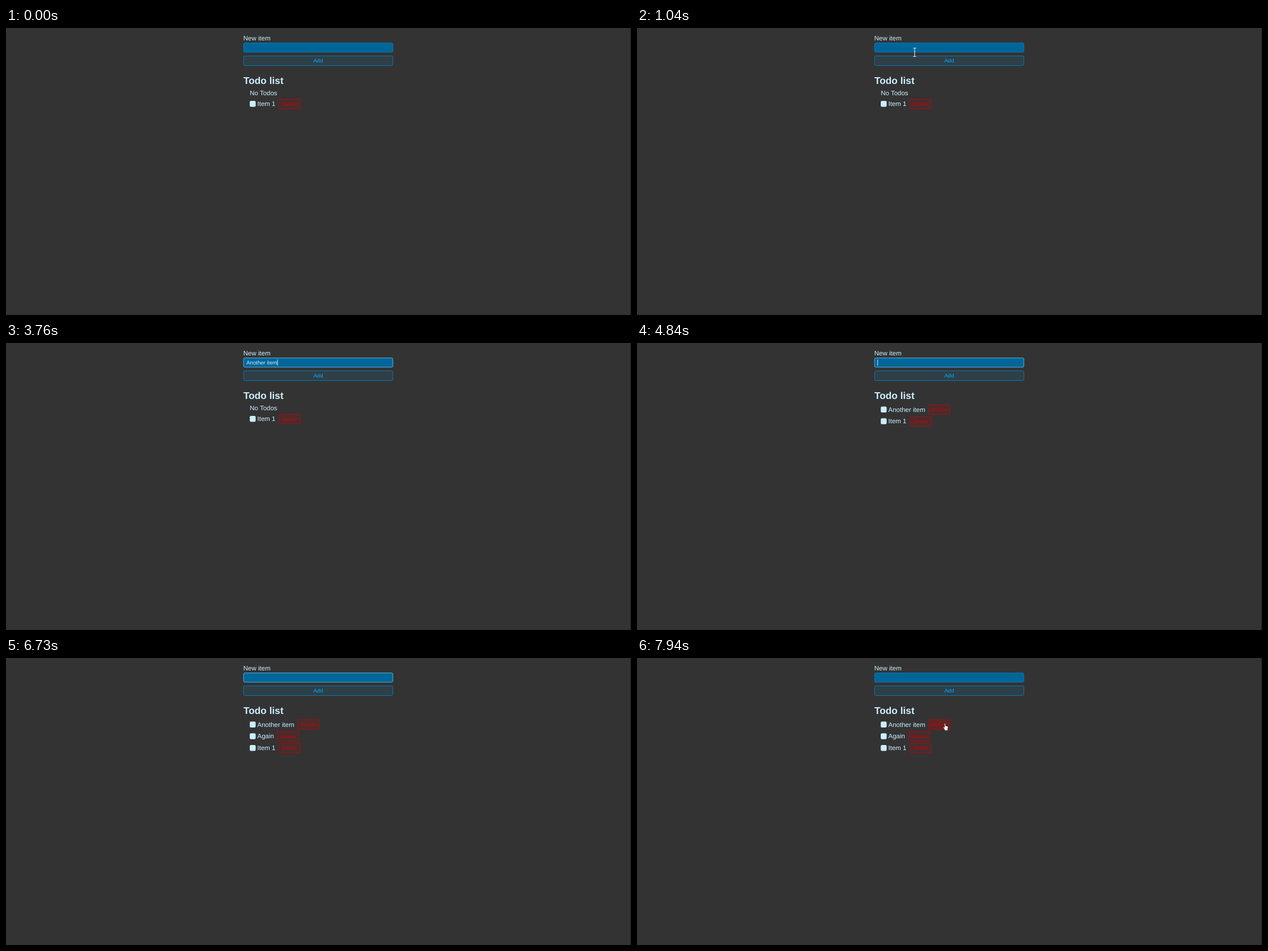
Animation, 1103 px wide and 508 px high, one loop 8000 ms. Source, as an HTML page:

```html
<!DOCTYPE html>
<html lang="en">
<head>
<meta charset="utf-8">
<title>Todo list</title>
<style>
  html, body { margin: 0; width: 100%; height: 100%; overflow: hidden; background: #333; }
  svg { display: block; width: 100vw; height: 100vh; }
  text {
    font: 11.52px "Liberation Sans", Arial, sans-serif;
    fill: hsl(200, 100%, 90%);
    text-rendering: geometricPrecision;
    white-space: pre;
  }
  .title { font-size: 17.28px; font-weight: bold; }
  .small { font-size: 9.6px; }
  .center { text-anchor: middle; }
  .field { fill: hsl(200, 100%, 30%); stroke: hsl(200, 100%, 40%); stroke-width: .8; }
  .field.focus { stroke: hsl(200, 100%, 70%); }
  .button rect { fill: hsla(200, 100%, 50%, .1); stroke: hsl(200, 100%, 40%); stroke-width: .8; }
  .button text { fill: hsl(200, 100%, 50%); }
  .button.hover rect { fill: hsla(200, 100%, 50%, .2); }
  .danger rect { fill: hsla(0, 100%, 40%, .1); stroke: hsl(0, 100%, 40%); }
  .danger text { fill: hsl(0, 100%, 40%); }
  .danger.hover rect { fill: hsla(0, 100%, 40%, .25); }
  .light { fill: hsl(200, 100%, 90%); }
  .cursor { fill: #fff; stroke: #111; stroke-width: .6; stroke-linejoin: round; }
  #beam { fill: none; stroke: #fff; stroke-width: 1; }
</style>
</head>
<body>
<svg viewBox="0 0 1103 508" preserveAspectRatio="none">
  <rect width="1103" height="508" fill="#333"/>
  <rect y="505" width="1103" height="3" fill="#382f32"/>
  <rect x="1102" width="1" height="508" fill="#1c1c1c"/>

  <text x="418.8" y="21.8">New item</text>
  <rect id="field" class="field" x="419.3" y="26.4" width="263.4" height="16.4" rx="2.3"/>
  <text id="value" class="small" x="424.2" y="37.7"></text>
  <rect id="caret" class="light" y="29.3" width="1" height="10.7"/>

  <g id="add" class="button">
    <rect x="419.3" y="49.4" width="263.4" height="17" rx="2.3"/>
    <text class="small center" x="551" y="60.6">Add</text>
  </g>

  <text class="title" x="419" y="99.3">Todo list</text>
  <text id="empty" x="430.2" y="119.4">No Todos</text>
  <g id="rows"></g>

  <path id="arrow" class="cursor" d="M0 0V10.2L2.3 8.1L3.8 11.6L5.4 10.9L3.9 7.5H7.2Z"/>
  <path id="hand" class="cursor" d="M-.8 .7Q0 -.6 .9 .7V4.6L4.2 5.2Q5.6 5.5 5.5 7L4.8 10.5V13H-.4V11.4L-3 7.8Q-3.4 6.4 -2.1 6.6L-.8 7.7Z"/>
  <path id="beam" d="M-2.5 -7.5H-.7L0 -7L.7 -7.5H2.5M0 -7V7M-2.5 7.5H-.7L0 7L.7 7.5H2.5"/>
</svg>

<script>
const LOOP = 8000;
const $ = id => document.getElementById(id);

const typing = [
  [0, ""], [2660, "A"], [2750, "An"], [2900, "Ano"], [2990, "Anot"],
  [3140, "Anoth"], [3220, "Anothe"], [3300, "Another "], [3450, "Another i"],
  [3540, "Another it"], [3690, "Another ite"], [3760, "Another item"], [4090, ""],
  [5650, "A"], [5900, "Ag"], [5980, "Aga"], [6070, "Again"], [6730, ""]
];
const focus = [[0, false], [1280, true], [7940, false]];
const blink = [
  [0, false], [1280, true], [1760, false], [2340, true], [4260, false], [4840, true],
  [5330, false], [5650, true], [6640, false], [7130, true], [7630, false]
];
const lists = [
  [0, ["Item 1"]], [4090, ["Another item", "Item 1"]],
  [6730, ["Another item", "Again", "Item 1"]]
];
const deleteX = { "Another item": 514.8, "Again": 478.9, "Item 1": 482 };

// Pointer samples: time, shape, x, y
const pointer = [
  [0, null], [180, "arrow", 806, 272], [256, "arrow", 820, 206], [332, "arrow", 830, 152],
  [408, "arrow", 836, 114], [484, "arrow", 838, 94], [560, "arrow", 839, 87],
  [800, "arrow", 730, 86], [880, "arrow", 589, 83], [960, "hand", 526, 61],
  [1040, "beam", 490, 43], [1110, "beam", 478, 40], [1280, null],
  [7390, "hand", 565.5, 63.5], [7470, "arrow", 563, 72], [7550, "arrow", 560, 82],
  [7630, "arrow", 556, 92], [7710, "arrow", 551, 101], [7780, "hand", 546, 111],
  [7860, "hand", 543.5, 115.5]
];

const at = (track, t) => track.findLast(key => key[0] <= t);
const show = (el, on) => el.style.display = on ? "" : "none";

function row(name, y) {
  const x = deleteX[name];
  return `<rect class="light" x="430.2" y="${y - 5.2}" width="10.4" height="10.4" rx="2.2"/>
    <text x="443.5" y="${y + 3.7}">${name}</text>
    <g class="button danger">
      <rect x="${x}" y="${y - 8.5}" width="37.6" height="17" rx="1"/>
      <text class="small center" x="${x + 18.8}" y="${y + 3.2}">Delete</text>
    </g>`;
}

let shownList;
function drawList(items) {
  if (items === shownList) return;
  shownList = items;
  const top = items.length === 1 ? 134.3 : 117.8;
  show($("empty"), items.length === 1);
  $("rows").innerHTML = items.map((name, i) => row(name, top + i * 20.7)).join("");
}

function render(t) {
  drawList(at(lists, t)[1]);

  $("value").textContent = at(typing, t)[1];
  $("field").classList.toggle("focus", at(focus, t)[1]);
  show($("caret"), at(focus, t)[1] && at(blink, t)[1]);
  $("caret").setAttribute("x", 424.2 + $("value").getComputedTextLength());

  const [, shape, x, y] = at(pointer, t);
  for (const id of ["arrow", "hand", "beam"]) {
    show($(id), id === shape);
    if (id === shape) $(id).setAttribute("transform", `translate(${x} ${y})`);
  }
  $("add").classList.toggle("hover", shape === "hand" && y < 67);
  document.querySelector(".danger").classList.toggle("hover", shape === "hand" && y > 108);
}

const start = performance.now();
function tick() {
  render((performance.now() - start) % LOOP);
  requestAnimationFrame(tick);
}
tick();
</script>
</body>
</html>
```
